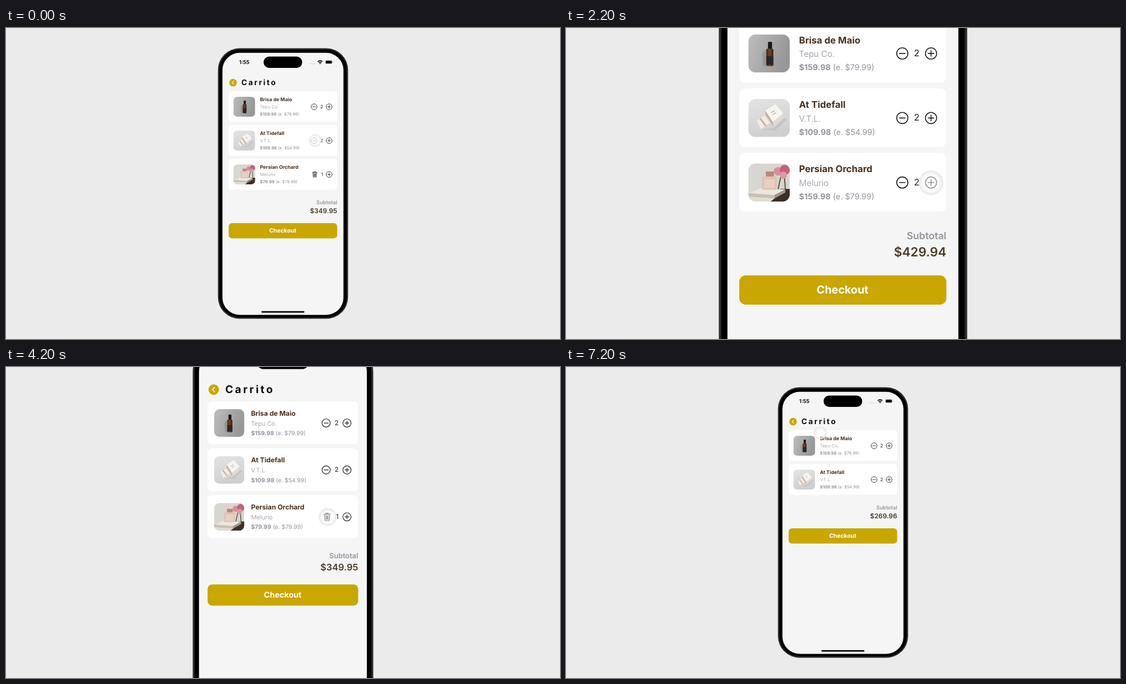
Recreate the animation shown at these times as an HTML page. Size 998 px wide and 561 px high, loop 7.3 s.

```html
<!DOCTYPE html>
<html lang="es">
<head>
<meta charset="utf-8">
<title>Carrito</title>
<style>
  html, body { margin: 0; width: 100%; height: 100%; overflow: hidden; background: #ebebeb; }
  svg { display: block; width: 100%; height: 100%; font-family: Inter, "Open Sans", sans-serif; }
  .name { font-size: 8.8px; font-weight: 700; fill: #4a301c; }
  .maker { font-size: 8px; font-weight: 300; fill: #918d9a; }
  .price { font-size: 7.55px; fill: #96929f; white-space: pre; }
  .price .total { font-weight: 700; }
  .qty { font-size: 8.6px; fill: #222; text-anchor: middle; }
  .icon { fill: none; stroke: #1c1c1c; stroke-width: .85; stroke-linecap: round; stroke-linejoin: round; }
</style>
</head>
<body>
<svg viewBox="0 0 998 561" text-rendering="geometricPrecision">
  <defs>
    <clipPath id="photo"><rect width="39.2" height="36" rx="7"/></clipPath>
    <linearGradient id="grey" x2="1" y2=".3">
      <stop stop-color="#bdbdbc"/><stop offset="1" stop-color="#979797"/>
    </linearGradient>
    <linearGradient id="pale" x2=".3" y2="1">
      <stop stop-color="#e4e4e4"/><stop offset="1" stop-color="#cfcfcf"/>
    </linearGradient>
    <linearGradient id="amber" x2="1">
      <stop stop-color="#4a2412"/><stop offset=".5" stop-color="#7d431f"/><stop offset="1" stop-color="#2f1a10"/>
    </linearGradient>
    <radialGradient id="touch">
      <stop stop-color="#fcfcfc" stop-opacity=".45"/>
      <stop offset=".62" stop-color="#f8f8f8" stop-opacity=".52"/>
      <stop offset=".9" stop-color="#e5e5e5" stop-opacity=".75"/>
      <stop offset="1" stop-color="#e0e0e0" stop-opacity=".25"/>
    </radialGradient>
  </defs>
  <rect width="998" height="561" fill="#ebebeb"/>

  <g id="scene">
    <rect x="381.8" y="36.5" width="234.4" height="488" rx="39" fill="#2b2b2d"/>
    <rect x="384.2" y="38.9" width="229.6" height="483.2" rx="36.8" fill="#000"/>
    <rect x="389.9" y="44.8" width="218" height="472.6" rx="31" fill="#f5f5f5"/>

    <text x="420" y="65.2" font-size="9.5" font-weight="600">1:55</text>
    <rect x="464" y="51.6" width="69.6" height="20.4" rx="10.2"/>
    <g fill="#b5b5b5">
      <circle cx="547.2" cy="64.4" r=".75"/><circle cx="550.2" cy="64.4" r=".75"/>
      <circle cx="553.2" cy="64.4" r=".75"/><circle cx="556.2" cy="64.4" r=".75"/>
    </g>
    <g fill="none" stroke="#000" stroke-width="1.5">
      <path d="M561.4 60.7Q565.8 56.9 570.2 60.7M563.2 62.6Q565.8 60.4 568.4 62.6"/>
    </g>
    <path d="M564.3 63.9Q565.8 62.8 567.3 63.9L565.8 65.4Z"/>
    <rect x="575.2" y="58.2" width="12.6" height="6.6" rx="2.2" fill="#f5f5f5" stroke="#999" stroke-width=".5"/>
    <rect x="576" y="59" width="11" height="5" rx="1.5"/>
    <rect x="588.4" y="60.4" width=".9" height="2.2" rx=".45" fill="#999"/>

    <circle cx="409" cy="98.6" r="6.8" fill="#c9a700"/>
    <path d="M410.2 95.7L407.3 98.6L410.2 101.5" fill="none" stroke="#fff" stroke-width="1.1" stroke-linecap="round" stroke-linejoin="round"/>
    <text x="424" y="103.4" font-size="13.8" font-weight="700" letter-spacing="2.5" fill="#0c0c0c">Carrito</text>

    <g id="rows"></g>

    <g id="summary">
      <text x="596.6" y="317.8" font-size="9.3" font-weight="600" text-anchor="end" fill="#96929f">Subtotal</text>
      <text id="subtotal" x="596.6" y="333.8" font-size="11.9" font-weight="600" text-anchor="end" fill="#4f3a26"></text>
      <rect x="401.1" y="351.9" width="195.5" height="27.6" rx="6" fill="#c9a700"/>
      <text x="498.6" y="369.2" font-size="10.4" font-weight="700" text-anchor="middle" fill="#fff">Checkout</text>
    </g>

    <rect x="460" y="510.7" width="77.6" height="2.7" rx="1.35"/>
    <g id="cursor">
      <circle r="11.8" fill="url(#touch)"/>
      <circle r="11.3" fill="none" stroke="#d5d5d5" stroke-opacity=".35" stroke-width=".5"/>
    </g>
  </g>
</svg>
<script>
const LOOP = 7300, STEP = 100;
const $ = id => document.getElementById(id);

const bottle = `<rect width="39.2" height="36" fill="url(#grey)"/>
  <path d="M13 18L17 14V30H14Z" fill="#777" opacity=".35"/>
  <rect x="18.6" y="7" width="3.8" height="7" rx=".8" fill="#171717"/>
  <rect x="17" y="13.4" width="6.6" height="16.6" rx="1.3" fill="url(#amber)"/>
  <rect x="17" y="20.6" width="6.6" height="8" fill="#292626"/>`;

const box = `<rect width="39.2" height="36" fill="url(#pale)"/>
  <path d="M12 29L24 27.5L34 18L36 20L25 30Z" fill="#aaa" opacity=".35"/>
  <path d="M33 13.5V18L24 26.5L23 21.5Z" fill="#e0dad2"/>
  <path d="M16 11L25.6 5L33 13.5L23 21.8Z" fill="#f7f4f0"/>
  <path d="M16 11L23 21.8L24 26.5L16.4 15Z" fill="#c2b09c"/>
  <path d="M21.5 13L25 11M23 14.8L26 13" stroke="#888" stroke-width=".5"/>
  <path d="M8 20.4L15.4 15.8L20.4 22.6L12 28.6Z" fill="#f1ece6"/>
  <path d="M10.5 18.8L12 17.9L17.3 25L15.7 26Z" fill="#cbb49c"/>`;

const flowers = `<rect width="39.2" height="36" fill="#d8d6d0"/>
  <path d="M31 11L28 25M34 11L35 25" stroke="#5c6a48" stroke-width="1.2"/>
  <circle cx="28" cy="7.5" r="4" fill="#d98e9c"/>
  <circle cx="34.5" cy="6" r="4.8" fill="#c9607a"/>
  <circle cx="33" cy="11" r="3.4" fill="#dc9aa5"/>
  <path d="M30 24H39.2V36H20Z" fill="#3a302a"/>
  <path d="M0 28L12 23.5L35 24.5L25 30Z" fill="#ebe7e0"/>
  <path d="M0 28L25 30V33L0 31.5Z" fill="#c9c0b5"/>
  <path d="M25 30L35 24.5V27.5L25 33Z" fill="#a2958a"/>
  <path d="M0 31.5L25 33L21 36H0Z" fill="#e1dcd4"/>
  <rect x="16.6" y="7.6" width="7.6" height="4.8" fill="#bd8876"/>
  <rect x="13" y="12.2" width="14" height="12.6" rx="1" fill="#dec4b6"/>
  <rect x="15" y="15" width="10" height="8" fill="#e8d0c2"/>`;

const items = [
  { name: 'Brisa de Maio', maker: 'Tepu Co.', each: 79.99, art: bottle },
  { name: 'At Tidefall', maker: 'V.T.L.', each: 54.99, art: box },
  { name: 'Persian Orchard', maker: 'Melurio', each: 79.99, art: flowers }
];

const ring = 'M-5.3 0A5.3 5.3 0 1 1 5.3 0A5.3 5.3 0 1 1 -5.3 0M-2.7 0H2.7';
const trash = 'M-4 -3.4H4M-1.6 -3.5V-4.8H1.6V-3.5M-3.3 -3.3L-2.8 4.8H2.8L3.3 -3.3M-1.4 -1.6L-1.2 3.2M0 -1.6V3.2M1.4 -1.6L1.2 3.2';
const money = v => '$' + v.toFixed(2);

$('rows').innerHTML = items.map((it, i) => `
  <g class="row" transform="translate(401.1 ${114.1 + 61 * i})">
    <rect width="195.5" height="55.5" rx="5.5" fill="#fff"/>
    <g transform="translate(8.5 10)" clip-path="url(#photo)">${it.art}</g>
    <text class="name" x="56.4" y="18.4">${it.name}</text>
    <text class="maker" x="56.4" y="31.4">${it.maker}</text>
    <text class="price" x="56.4" y="43.9"><tspan class="total"></tspan> (e. ${money(it.each)})</text>
    <path class="icon less"/>
    <text class="qty" y="30.6"></text>
    <path class="icon more" transform="translate(181 28)" d="${ring}M0 -2.7V2.7"/>
  </g>`).join('');

const rows = [...document.querySelectorAll('.row')].map(el => ({
  el,
  total: el.querySelector('.total'),
  less: el.querySelector('.less'),
  more: el.querySelector('.more'),
  qty: el.querySelector('.qty')
}));

const clamp = v => Math.min(1, Math.max(0, v));
const smooth = u => u * u * (3 - 2 * u);

// Value of a [time, value] list at t
function track(keys, t, ease = u => u) {
  const n = keys.findIndex(k => k[0] > t);
  if (n === 0) return keys[0][1];
  if (n < 0) return keys[keys.length - 1][1];
  const [a, from] = keys[n - 1], [b, to] = keys[n];
  return from + (to - from) * ease((t - a) / (b - a));
}

// Critically damped spring, rate per second
function spring(t, start, rate) {
  const x = Math.max(0, t - start) / 1000 * rate;
  return 1 - (1 + x) * Math.exp(-x);
}

const zoom = t => 1 + spring(t, 1612, 6.8) - spring(t, 3843, 5.8);

const restX = [[750, 557], [1750, 582], [2850, 582], [3300, 557]];
const restY = [[750, 203], [1500, 264.3]];
const exitX = [[5900, 557], [6000, 545], [6700, 495], [7200, 458]];
const exitY = [[5900, 264.3], [6000, 253], [6700, 160], [7200, 119]];

// Opacity of a button held from down to up
const press = (t, down, up) =>
  t < up ? 1 - .8 * clamp((t - down) / 100) : .2 + .8 * clamp((t - up) / 300);

function quantity(i, t) {
  if (i < 2) return 2;
  if (t >= 4900) return 0;
  return t >= 2000 && t < 3500 ? 2 : 1;
}

function draw(t) {
  const s = zoom(t);
  $('scene').setAttribute('transform', `translate(499 248) scale(${s}) translate(-499 -248)`);

  // Motion blur follows the zoom speed
  const speed = Math.abs(zoom(t + 10) - zoom(t - 10)) * 50;
  $('scene').style.filter = speed > .3 ? `blur(${.2 * speed}px)` : '';

  let sum = 0;
  rows.forEach((row, i) => {
    const n = quantity(i, t), single = n === 1;
    sum += n * items[i].each;
    row.el.style.display = n ? '' : 'none';
    row.total.textContent = money(n * items[i].each);
    row.qty.textContent = n;
    row.qty.setAttribute('x', single ? 168.4 : 167.5);
    row.less.setAttribute('d', single ? trash : ring);
    row.less.setAttribute('transform', `translate(${single ? 155.1 : 153.9} 28)`);
  });
  rows[1].less.style.opacity = press(t, -300, -120);
  rows[2].more.style.opacity = press(t, 1750, 1950);
  rows[2].less.style.opacity = t < 4000 ? press(t, 3320, 3480) : press(t, 4700, 4880);

  $('subtotal').textContent = money(sum);
  $('summary').setAttribute('transform', `translate(0 ${t < 4900 ? 0 : -61})`);

  const leaving = t >= 5900;
  const x = leaving ? track(exitX, t) : track(restX, t, smooth);
  const y = leaving ? track(exitY, t) : track(restY, t, smooth);
  $('cursor').setAttribute('transform', `translate(${x} ${y})`);
}

const start = performance.now();
function tick() {
  const t = (performance.now() - start + 4) % LOOP;
  draw(Math.floor(t / STEP) * STEP);
  requestAnimationFrame(tick);
}
tick();
</script>
</body>
</html>
```
